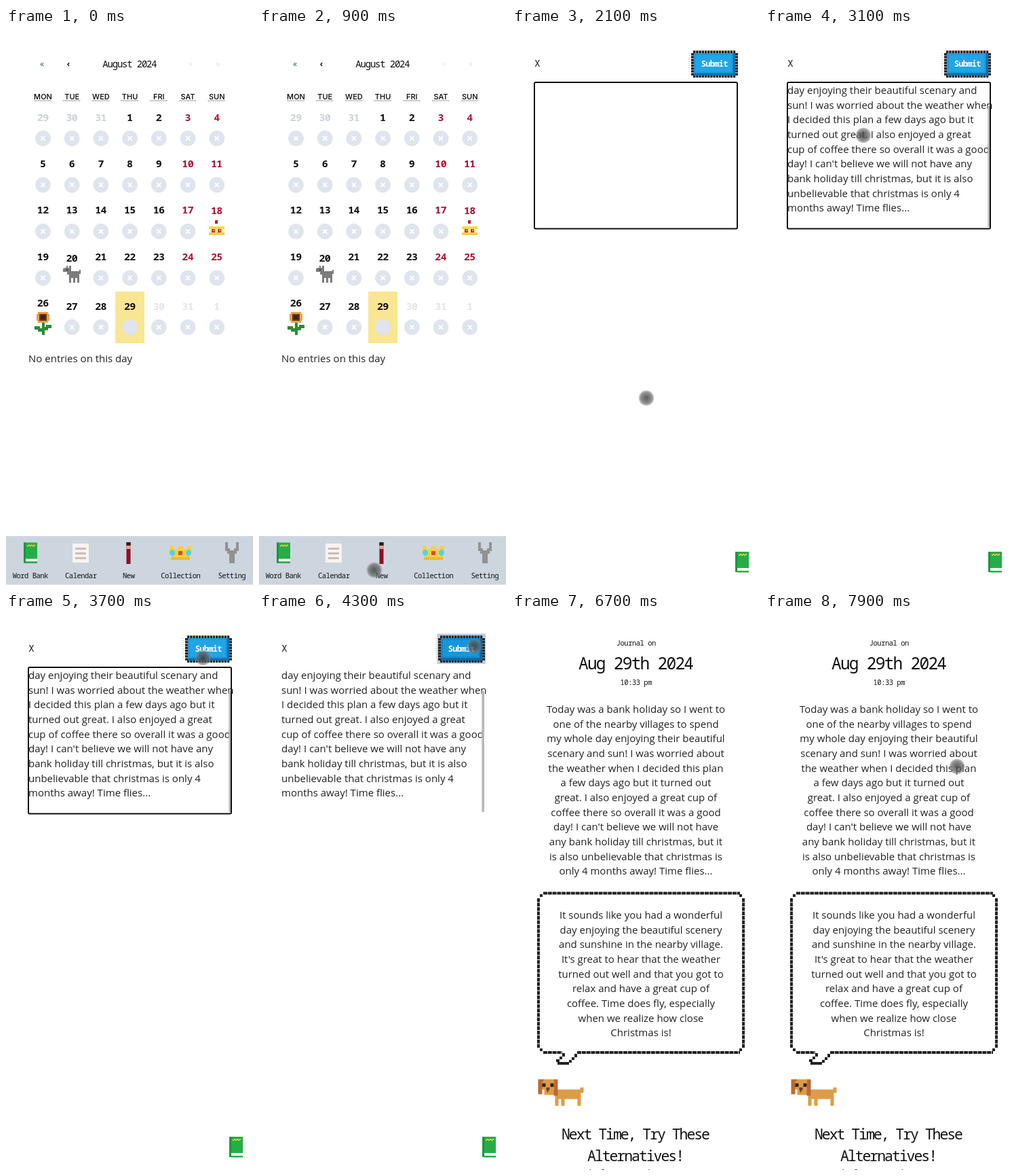
Write an HTML page that moves like this. It is 364 by 820 pixels and loops after 8000 ms.

```html
<!DOCTYPE html>
<html lang="en">
<head>
<meta charset="utf-8">
<title>Journal</title>
<style>
html, body { margin: 0; width: 100%; height: 100%; overflow: hidden; background: #fff; }
svg { display: block; }
text { white-space: pre; }
.body { font: 15px "Open Sans", "Noto Sans", sans-serif; fill: #222; }
.mono { font-family: "Noto Sans Mono", "DejaVu Sans Mono", monospace; font-weight: 500; fill: #111; }
.day { font: 500 11px Inter, Roboto, sans-serif; }
</style>
</head>
<body>
<svg id="stage" width="364" height="820" viewBox="0 0 364 820"></svg>
<script>
const LINE = 21.65;
const path = (color, d) => `<path fill="${color}" d="${d}"/>`;
const box = (color, x, y, w, h, more = '') =>
  `<rect x="${x}" y="${y}" width="${w}" height="${h}" fill="${color}" ${more}/>`;
const at = (x, y, art) => `<g transform="translate(${x} ${y})">${art}</g>`;

// Monospaced label centred on x; pitch is the distance between letters.
const mono = (x, y, s, size, pitch, color = '#111', weight = 500) => {
  const gap = pitch - size * 0.6;
  return `<text class="mono" x="${x + gap / 2}" y="${y}" text-anchor="middle" style="font-size:${size}px;font-weight:${weight};letter-spacing:${gap}px;fill:${color}">${s}</text>`;
};
const lines = (x, y, anchor, s) => s.split('\n').map((row, i) =>
  `<text class="body" x="${x}" y="${y + i * LINE}" text-anchor="${anchor}">${row}</text>`).join('');
const dashes = (d, width, pattern) =>
  `<path d="${d}" fill="none" stroke="#222" stroke-width="${width}" stroke-dasharray="${pattern}"/>`;

const book = box('#27ad47', 0, 0, 20, 30) + box('#159a39', 0, 0, 3, 30) +
  path('#e5cf3d', 'M5 4h2v-1h2v1h2v-1h2v1h2v-1h2v2h-2v1h-2v-1h-2v1h-2v-1h-2v1h-2z') +
  box('#fff', 3, 24, 17, 4) + box('#27ad47', 3, 28, 17, 2.5);
const sheet = box('#f6f3f1', 0, 0, 24, 28) +
  [6, 13, 20].map(y => box('#cbbdb5', 4, y, 16, 3)).join('');
const pencil = box('#8b1020', 0, 0, 6, 32) + box('#222', 0, 0, 6, 5) + box('#f0a58e', 0, 5, 6, 5);
const crown = path('#f6cf45', 'M0 0h6v5h6v-4h8v4h6v-5h6v8h-2v13h-26v-13h-4z') +
  box('#efb92f', 2, 17, 28, 4) +
  [4, 28].map(x => path('#4fd4e2', `M${x - 2} 6h4v2h2v5h-2v2h-4v-2h-2v-5h2z`)).join('') +
  box('#dc4a36', 13, 8, 6, 6);
const wrench = path('#929292',
  'M0 0h4v9h3v3h6v-3h3v-9h4v13h-3v4h-3v14h-8v-14h-3v-4h-3z');
const cake = box('#c51236', 9, 0, 4, 5) + box('#f9d94f', 0, 9, 23, 4) +
  box('#fff0b0', 2, 13, 19, 5) + box('#f9cf46', 0, 18, 23, 4) +
  box('#d52a3b', 4, 13, 5, 5) + box('#d52a3b', 13, 13, 5, 5) +
  box('#f4a092', 6, 14, 2, 2) + box('#f4a092', 15, 14, 2, 2);
const donkey = path('#7c7c7c',
  'M2 3h3v-3h2v3h2v-3h3v8h12v-2h2v6h-2v13h-3v-7h-3v7h-3v-7h-3v7h-3v-12h-3v-4h-6v-5h2z') +
  box('#333', 5, 5, 2, 2);
const flower = path('#eba04b', 'M5 0h15v3h2v10h-2v3h-15v-3h-2v-10h2z') +
  box('#68391d', 7, 3, 11, 10) + box('#46230f', 9, 5, 7, 6) +
  path('#2b8b3a', 'M11 16h4v6h2v-3h8v5h-5v3h-5v7h-4v-5h-6v-3h-5v-5h8v3h3z');
const dog = path('#dd9c45',
  'M5 0h18v15h39v-3h5v8h-4v19h-5v-10h-19v10h-5v-10h-4v10h-5v-16h-16v-8h-4z') +
  path('#bb6a32', 'M0 0h8v3h-2v19h-6zM23 0h6v24h-6z') +
  box('#2b2118', 6, 6, 5, 5) + box('#2b2118', 18, 6, 5, 5) +
  path('#6a3d20', 'M12 12h5v4h-2v3h-2v-3h-1z');

function dayCell(n, col, row) {
  const day = n < 1 ? n + 31 : n > 31 ? n - 31 : n;
  const x = 54.5 + 42.7 * col;
  const top = [131, 199, 267, 336, 409][row];
  const color = n < 1 ? '#ccd1da' : n > 29 ? '#e2e5ed' : col > 4 ? '#ad1233' : '#111';
  const art = { 18: [299, 283, cake], 20: [84, 350, donkey], 26: [42, 418, flower] }[n];
  const shift = { 18: 1, 20: 2, 26: -5 }[n] || 0;
  const cy = [162.5, 231, 299.5, 368, 440.5][row];
  const badge = `<circle cx="${x}" cy="${cy}" r="11.4" fill="#dfe4ee"/>` +
    (n === 29 ? '' : `<path d="M${x - 3} ${cy - 3}l6 6m0-6l-6 6" stroke="#fff" stroke-width="1.8"/>`);
  return (n === 29 ? box('#f8e693', 161, 388, 43, 76) : '') +
    mono(x, top + 5.5 + shift, day, 15, 8.3, color, 600) + (art ? at(...art) : badge);
}

function calendar() {
  let s = mono(53, 57, '«', 12, 7, '#35605f') + mono(92, 57, '‹', 13, 7, '#222', 700) +
    mono(182.5, 58, 'August 2024', 14, 7.2) +
    mono(272, 57, '›', 13, 7, '#dcdfe4') + mono(312, 57, '»', 12, 7, '#dcdfe4');
  ['MON', 'TUE', 'WED', 'THU', 'FRI', 'SAT', 'SUN'].forEach((name, i) => {
    const x = 54.5 + 42.7 * i;
    s += `<text class="day" x="${x}" y="105" text-anchor="middle">${name}</text>` +
      `<path d="M${x - 13} 107h26" stroke="#333" stroke-dasharray="1 1"/>`;
  });
  for (let i = 0; i < 35; i++) s += dayCell(i - 2, i % 7, Math.floor(i / 7));
  s += lines(33, 492, 'start', 'No entries on this day') + box('#cdd5df', 0, 748, 364, 71.5);
  s += at(26, 757.5, book) + at(98, 759, sheet) + at(177.5, 757, pencil) +
    at(241, 762, crown) + at(323, 757, wrench);
  [[36, 'Word Bank'], [110.5, 'Calendar'], [181, 'New'], [257.5, 'Collection'], [333, 'Setting']]
    .forEach(([x, name]) => s += mono(x, 810, name, 10.5, 5.8));
  return s;
}

function button(face, light, edge, halo) {
  return (halo ? box('#bccbdc', 262.5, 30.5, 71.5, 44.5) : '') +
    `<path d="M261 37v32" stroke="#aaa" stroke-dasharray="1 2"/>` +
    dashes('M267 35.2h63M267 71h63', 4, '3.4 .8') +
    dashes('M266 37v33M331 37v33', 4, '3.4 .8') +
    box(edge, 268, 37, 61, 33) + box(face, 268, 37, 57.5, 29.5) + box(light, 271, 40, 52, 24) +
    mono(298.5, 56.5, 'Submit', 12, 6.5, '#fff', 700);
}

const entry = `day enjoying their beautiful scenary and
sun! I was worried about the weather when
I decided this plan a few days ago but it
turned out great. I also enjoyed a great
cup of coffee there so overall it was a good
day! I can't believe we will not have any
bank holiday till christmas, but it is also
unbelievable that christmas is only 4
months away! Time flies...`;

const editor = () => mono(37.5, 57, 'X', 14, 8) +
  `<g id="idle">${button('#1b9cdd', '#22a5e6', '#0d6fb0', false)}</g>` +
  `<g id="hover">${button('#1089d0', '#1597de', '#0b68a8', true)}</g>` +
  `<g id="entry">${lines(33, 97, 'start', entry)}${box('#b9b9b9', 328.3, 115, 3.7, 178)}</g>` +
  box('#111', 34, 84, 1, 17, 'id="caret"') +
  box('none', 33, 80, 299, 215.5, 'id="focus" rx="2" stroke="#111" stroke-width="2"') +
  at(329, 771, book);

const journal = `Today was a bank holiday so I went to
one of the nearby villages to spend
my whole day enjoying their beautiful
scenary and sun! I was worried about
the weather when I decided this plan
a few days ago but it turned out
great. I also enjoyed a great cup of
coffee there so overall it was a good
day! I can't believe we will not have
any bank holiday till christmas, but it
is also unbelievable that christmas is
only 4 months away! Time flies...`;
const reply = `It sounds like you had a wonderful
day enjoying the beautiful scenery
and sunshine in the nearby village.
It's great to hear that the weather
turned out well and that you got to
relax and have a great cup of
coffee. Time does fly, especially
when we realize how close
Christmas is!`;

function bubble() {
  let s = dashes('M46 412.5H336M46 647H74M96 647H336', 4, '6 .8') +
    dashes('M39 420V641M341 420V641', 4, '5.6 .9');
  for (const [x, y] of [[41, 414], [335, 414], [41, 641], [335, 641]]) s += box('#222', x, y, 4, 4);
  return s + path('#222',
    'M74 648h4v5h-4zM70 653h4v4h-4zM65 657h5v4h-5zM67 661h17v4h-17zM84 658h4v4h-4zM88 654h4v4h-4zM92 649h4v5h-4z');
}

const result = () => mono(183, 48, 'Journal on', 10.5, 5.8) +
  mono(183, 83, 'Aug 29th 2024', 24.5, 12.95) + mono(183, 106, '10:33 pm', 10.5, 5.8) +
  lines(182.5, 147, 'middle', journal) + bubble() + lines(190, 450, 'middle', reply) +
  at(38.5, 686.5, dog) +
  mono(182.5, 775, 'Next Time, Try These', 21.5, 10.85) +
  mono(182.5, 807, 'Alternatives!', 21.5, 10.85) +
  lines(182.5, 830, 'middle', 'Instead of writing plain sentences');

document.getElementById('stage').innerHTML =
  `<defs><radialGradient id="spot"><stop offset=".2" stop-color="#444" stop-opacity=".8"/>
   <stop offset=".75" stop-color="#666" stop-opacity=".7"/><stop offset="1" stop-color="#888" stop-opacity=".4"/></radialGradient></defs>
   <g id="calendar">${calendar()}</g><g id="editor">${editor()}</g><g id="result">${result()}</g>
   <circle id="pointer" r="11.3" fill="url(#spot)"/>`;

const el = id => document.getElementById(id);
const show = (id, on) => el(id).style.display = on ? '' : 'none';

// Pointer moves: start, end, from, to, sideways bulge
const moves = [
  [100, 900, [376, 590], [170, 798], 0],
  [1800, 2500, [170, 798], [145, 158], 40],
  [3100, 3900, [145, 158], [317, 49], 0],
  [7500, 7900, [376, 715], [283, 226], 0]
];

function pointer(t) {
  const move = moves.filter(m => m[0] <= t).pop();
  const on = move && t < 4700 || t >= 7500;
  show('pointer', on);
  if (!on) return;
  const [start, end, a, b, bulge] = move;
  const p = Math.min(1, (t - start) / (end - start));
  const k = p * p * (3 - 2 * p);
  const x = a[0] + (b[0] - a[0]) * k + bulge * Math.sin(Math.PI * k);
  const y = a[1] + (b[1] - a[1]) * k;
  el('pointer').setAttribute('transform', `translate(${x} ${y})`);
  el('pointer').style.opacity = t > 4300 && t < 4700 ? (4700 - t) / 400 : 1;
}

function draw(now) {
  const t = now % 8000;
  show('calendar', t < 1700);
  show('editor', t >= 1700 && t < 6700);
  show('result', t >= 6700);
  show('entry', t >= 3100);
  show('caret', t < 3100 && t % 1000 >= 700);
  show('focus', t < 4200);
  show('idle', t < 4200);
  show('hover', t >= 4200);
  pointer(t);
  requestAnimationFrame(draw);
}
requestAnimationFrame(draw);
</script>
</body>
</html>
```
